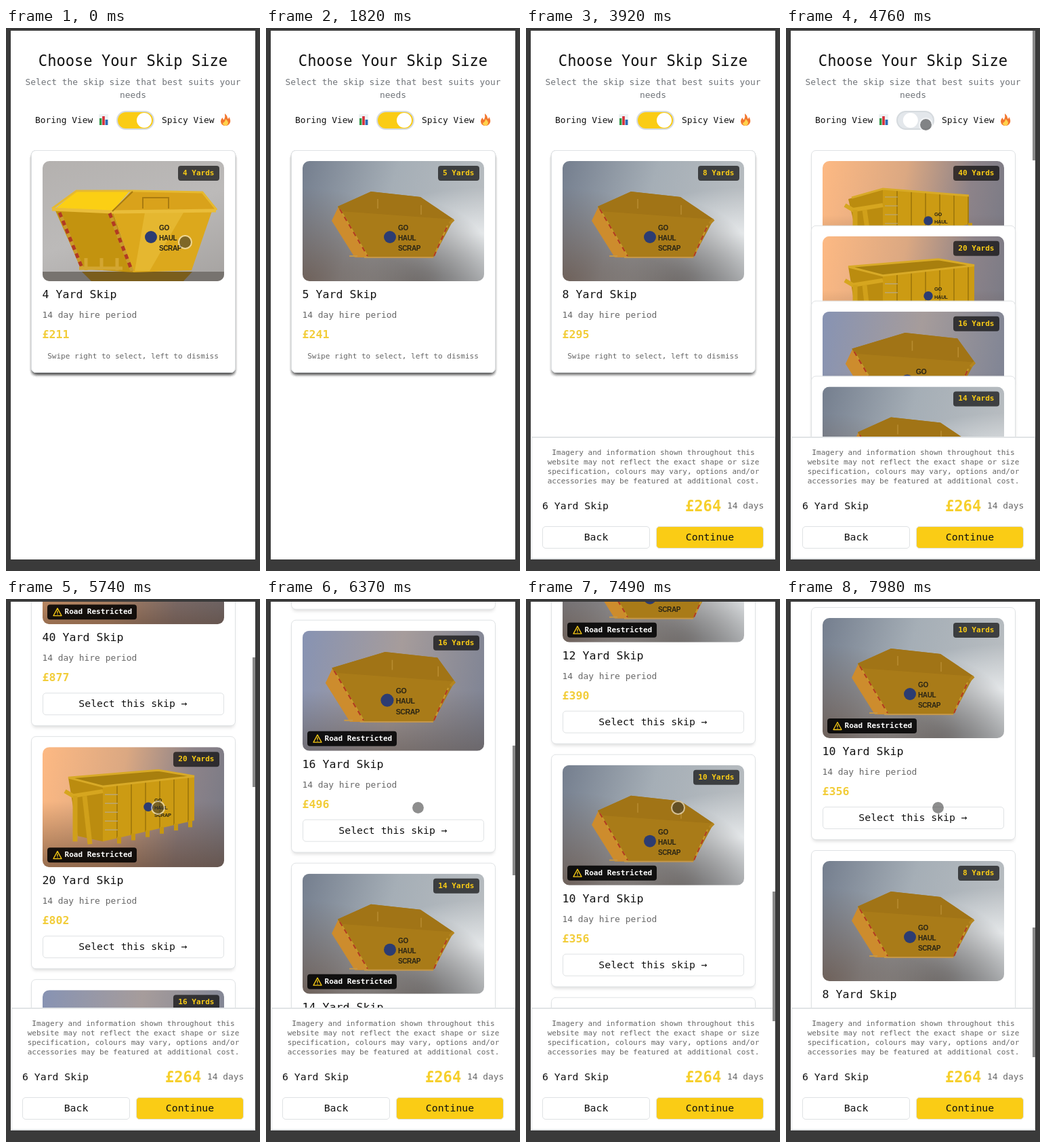
An HTML page for the animation above (8 s loop, 375 by 800 pixels).

```html
<!DOCTYPE html>
<html lang="en">
<head>
<meta charset="utf-8">
<title>Choose Your Skip Size</title>
<style>
* { box-sizing: border-box; margin: 0; }
html, body { width: 100%; height: 100%; overflow: hidden; background: #3a3a3a; }
body { font: 12.9px/20px 'DejaVu Sans Mono', 'Noto Sans Mono', monospace; color: #111; }
body * { position: absolute; white-space: nowrap; }
br { position: static; }
#win { left: 7px; top: 4px; width: 361px; height: 779px; background: #fff; overflow: hidden; }
#stage { left: -7px; top: -4px; width: 375px; height: 800px; }
#page { width: 375px; height: 800px; }
h1 { left: 0; width: 375px; top: 32px; text-align: center; font-size: 22.1px; line-height: 32px; font-weight: 400; }
.sub { left: 0; width: 375px; top: 71px; text-align: center; line-height: 18.5px; color: #6f7378; }
#track { left: 163px; top: 122px; width: 56px; height: 28px; border: 2px solid #d5dade; border-radius: 14px; }
#knob { left: 193px; top: 125px; width: 22px; height: 22px; border-radius: 50%; background: #fff; }
.icon { width: 16px; height: 18px; }
.card { left: 37px; top: 180px; width: 301.5px; height: 328px; background: #fff; border: 1.5px solid #dfe2e4;
  border-radius: 7px; box-shadow: 0 4px 5px -2px rgba(0,0,0,.14); }
.card > * { left: 15.5px; }
.pic { top: 14.5px; width: 268px; height: 177px; border-radius: 10px; overflow: hidden; }
.pic svg { left: 0; top: 0; }
.tag { height: 22px; line-height: 22px; padding: 0 7px; border-radius: 4px; background: rgba(0,0,0,.66);
  color: #facc15; font-size: 11.05px; font-weight: 700; }
.yards { top: 7px; right: 7px; }
.road { left: 7px; bottom: 7px; padding-left: 26px; color: #fff; background: rgba(0,0,0,.87); }
.road svg { left: 8px; top: 4px; }
.name { top: 202px; font-size: 16.6px; }
.days { top: 232px; color: #666; }
.price { top: 261px; font-size: 16.6px; font-weight: 700; color: #f2cd3a; }
.hint { top: 293px; width: 268px; text-align: center; font-size: 11.05px; color: #666; }
.btn { height: 33px; line-height: 30px; text-align: center; font-size: 14.8px; border: 1.5px solid #dfe2e4; border-radius: 5px; background: #fff; }
.card .btn { top: 292.5px; width: 268px; }
.card .btn, .card .road, .grid .hint { display: none; }
.grid .btn, .grid .road { display: block; }
.grid .card { height: 343px; }
#foot { left: 8px; top: 602px; width: 360px; height: 181px; background: #fff; border: 2px solid #e1e4e6; border-width: 2px 1px; }
#foot .note { left: 0; width: 358px; top: 15px; text-align: center; font-size: 11.05px; line-height: 14px; color: #666; }
#foot .btn { top: 129.5px; width: 159px; }
#bar { left: 364px; width: 4px; height: 191px; background: #8b8b8b; }
#dot { width: 21px; height: 21px; margin: -10.5px; border-radius: 50%; border: 2px solid rgba(255,255,255,.55);
  background: rgba(50,50,50,.55); background-clip: padding-box; }
</style>
</head>
<body>
<div id="win"><div id="stage">
  <div id="page">
    <h1>Choose Your Skip Size</h1>
    <div class="sub">Select the skip size that best suits your<br>needs</div>
    <span style="left:43px;top:126px">Boring View</span>
    <svg class="icon" style="left:136px;top:126px" viewBox="0 0 16 18">
      <path d="M1 1H15V17H1Z" fill="#eef1f3"/><path d="M2 7H5.4V17H2Z" fill="#2f9e44"/>
      <path d="M6.2 4H9.8V17H6.2Z" fill="#d6303a"/><path d="M10.6 9H14.4V17H10.6Z" fill="#2b6cb8"/>
    </svg>
    <div id="track"></div><div id="knob"></div>
    <span style="left:230px;top:126px">Spicy View</span>
    <svg class="icon" style="left:316px;top:126px" viewBox="0 0 16 18">
      <path d="M7 0C12 4 10 6 12 8Q13 7 13 5Q16 9 15 13Q13 18 8 18Q2 18 1 12Q1 8 4 6Q4 9 6 9Q8 5 7 0Z" fill="#f2762e"/>
      <path d="M8 8Q12 11 12 14Q11 18 8 18Q4 17 4 14Q8 12 8 8Z" fill="#ffd34d"/>
    </svg>
    <div id="cards"></div>
  </div>
  <div id="foot">
    <div class="note">Imagery and information shown throughout this<br>website may not reflect the exact shape or size<br>specification, colours may vary, options and/or<br>accessories may be featured at additional cost.</div>
    <span style="left:15px;top:90px;font-size:14.8px">6 Yard Skip</span>
    <b style="left:226px;top:90px;font-size:22.1px;color:#f6cf2c">£264</b>
    <span style="left:288px;top:90px;color:#666">14 days</span>
    <div class="btn" style="left:15px">Back</div>
    <div class="btn" style="left:183px;background:#facc15">Continue</div>
  </div>
  <div id="bar"></div>
  <div id="dot"></div>
</div></div>
<script>
const $ = id => document.getElementById(id);
const fill = (d, color) => `<path d="M${d}Z" fill="${color}"/>`;
const line = (d, color, w = 2, dash = '') => `<path d="M${d}" fill="none" stroke="${color}" stroke-width="${w}" stroke-dasharray="${dash}"/>`;
const hazard = (d, w) => line(d, '#c99a2c', w) + line(d, '#b23a22', w, '7 6');
const repeat = (n, draw) => Array.from({ length: n }, (_, i) => draw(i)).join('');
// pictures use the coordinates of a card resting in the deck
const svg = body => `<svg width="268" height="177" viewBox="54 196 268 177">${body}</svg>`;

// plain disc plus three short words printed on the side
const print = (x, y, s = 1) => `<g transform="translate(${x} ${y}) scale(${s})"><circle cx="-12" r="9" fill="#2c3c72"/>` +
  ['GO', 'HAUL', 'SCRAP'].map((w, i) => `<text y="${i * 15 - 10}" font-family="Liberation Sans, Arial, sans-serif" ` +
    `font-size="10" font-weight="700" letter-spacing="-.4" fill="#2a2515">${w}</text>`).join('') + '</g>';

const openSkip = () => svg(
  fill('54 359H322V373H54', '#77736f') +
  fill('112 359H275L262 373H126', '#7a5d1c') +
  fill('72 267L158 271L188 360L111 355', '#c3930f') +
  fill('158 271L304 270L274 357L188 360', '#dca81c') +
  fill('205 272H262L212 358H190', '#ffe16e40') +
  fill('103 241H182L157 270L72 267', '#fbcf14') +
  fill('157 270L186 239L290 242L311 268', '#d9a21b') +
  line('68 266L104 240H188L290 242L311 268', '#e6b930', 3) +
  line('68 267L157 271L310 269', '#e9bd3a', 5) +
  line('157 270L187 241M202 266V250H240V266', '#a97b10') +
  hazard('79 272L113 355', 5) + hazard('153 273L186 358', 5) +
  line('108 354H172', '#d3a631', 5) +
  repeat(3, i => line(`${118 + i * 23} 339V357`, '#d3a631', 5)) +
  print(226, 308));

const closedSkip = (peak = 155, place = '') => svg(`<g transform="${place}">` +
  fill('97 284L107 263L151 338H131', '#cd8c2d') +
  fill(`106 263L${peak} 241L${peak + 73} 249L277 282L247 338H151`, '#a97b18') +
  fill(`106 263L${peak} 241L${peak + 73} 249L277 282L110 270`, '#a17416') +
  line('271 288L277 282', '#b4851f', 4) +
  line(`${peak + 10} 252V266M${peak + 74} 261V275`, '#b98d30', 1.5) +
  hazard('109 267L150 336', 2) + hazard('248 336L268 291', 2) +
  line('123 336H135M145 338H247', '#c4974a') +
  print(195, 308) + '</g>');

function container(tall) {
  const right = tall ? 270 : 278, front = tall ? 237 : 254, drop = tall ? 10 : -15, low = tall ? 320 : 335;
  const along = (y, dy) => x => y + dy * (x - 143) / (right - 143);
  const rim = along(front, drop), base = along(low, -31);
  return svg(
    (tall ? '' : fill(`92 241L225 230L${right} 238L143 254`, '#a87f0e')) +
    fill(`92 ${tall ? 252 : 241}L143 ${front}V${low}L106 ${low - 8}`, '#bb8c0f') +
    fill(`143 ${front}L${right} ${rim(right)}V${base(right)}L143 ${low}`, '#cc9b13') +
    repeat(6, i => {
      const x = 164 + i * 21;
      return line(`${x} ${rim(x)}V${base(x)}`, '#a67d0c') + line(`${x + 3} ${base(x) - 2}v10`, '#c79710', 6);
    }) +
    line(tall ? `97 250L143 237L${right} 247` : `92 241L143 254L${right} 239L225 230Z`, '#d8aa27', 3) +
    line('87 261L99 268L143 261', '#d6a61f', 6) +
    line(`102 268V${low}M116 268L124 ${low + 4}`, '#d0a01a', 7) +
    repeat(5, i => line(`146 ${front + 12 + i * 13}h19`, '#b7a98a', 1.2)) +
    print(219, 284, .75));
}

const steel = 'radial-gradient(at 0 100%,#69564acc,transparent 55%),radial-gradient(at 65% 115%,#5f5a58e6,transparent 50%),' +
  'radial-gradient(at 100% 60%,#e4e7e9,transparent 45%),linear-gradient(105deg,#747e8e,#a5aeb6 45%,#bcc0c3)';
const peach = 'linear-gradient(transparent 45%,#5a3e2c99),linear-gradient(100deg,#fdb983,#dba882 42%,#8d8389 75%,#777985)';
const dusk = 'linear-gradient(transparent 50%,#5f555099),linear-gradient(100deg,#8793b3,#a69c9b 50%,#7c8294)';
const plain = 'linear-gradient(160deg,#b4b1af,#bcbab9 50%,#a5a2a0)';
const art = {
  40: [peach, container(true)],
  20: [peach, container(false)],
  16: [dusk, closedSkip(180, 'translate(-15 -28) scale(1.06)')],
  4: [plain, openSkip()]
};
const prices = { 40: 877, 20: 802, 16: 496, 14: 434, 12: 390, 10: 356, 8: 295, 6: 264, 5: 241, 4: 211 };
const warn = '<svg width="14" height="14" viewBox="0 0 14 14" fill="none" stroke="#facc15" stroke-width="1.3" stroke-linejoin="round"><path d="M7 1.5L13 12.5H1Z M7 5V9M7 10.2V11.2"/></svg>';

// largest first, so the smallest lies on top of the deck
const sizes = Object.keys(prices).sort((a, b) => b - a);
$('cards').innerHTML = sizes.map(n => {
  const [bg, pic] = art[n] || [steel, closedSkip()];
  return `<div class="card"><div class="pic" style="background:${bg}">${pic}<span class="tag yards">${n} Yards</span>` +
    (n > 8 ? `<span class="tag road">${warn}Road Restricted</span>` : '') +
    `</div><span class="name">${n} Yard Skip</span><span class="days">14 day hire period</span><span class="price">£${prices[n]}</span>` +
    `<span class="hint">Swipe right to select, left to dismiss</span><div class="btn">Select this skip →</div></div>`;
}).join('');
const cards = [...$('cards').children];

const LOOP = 8000, FLIP = 4715;
const part = (t, from, to) => Math.min(1, Math.max(0, (t - from) / (to - from)));
const smooth = (...a) => { const u = part(...a); return u * u * (3 - 2 * u); };
const easeOut = (...a) => 1 - (1 - part(...a)) ** 3;

// sideways drag of the three top cards
const swipes = {
  4: t => 160 * smooth(t, 660, 1120) - 80 * smooth(t, 30, 490) - 358 * smooth(t, 1430, 1800),
  5: t => -304 * smooth(t, 2400, 2830),
  6: t => 154 * smooth(t, 3170, 3410)
};

function pointer(t) {
  if (t < 2010) return [264 + swipes[4](t), 315];
  if (t < 2850) return [58 + 232 * smooth(t, 2010, 2310) + swipes[5](t), 400 - 90 * smooth(t, 2010, 2310)];
  const click = smooth(t, 3600, 4550), rest = smooth(t, 4800, 5300);
  return [314 * smooth(t, 2880, 3080) - 14 + swipes[6](t) - 248 * click + 18 * rest, 310 - 168 * click + 165 * rest];
}

function scrollAt(t) {
  const slow = part(t, 7000, 7980);
  return 335 * part(t, 5000, 5740) ** 2 + 1059 * part(t, 5740, 7000) + 823 * slow - 259 * slow * slow;
}

function draw(t) {
  const grid = t >= FLIP, [px, py] = pointer(t), scroll = scrollAt(t);
  const spread = easeOut(t, FLIP, FLIP + 396);
  $('cards').className = grid ? 'grid' : '';
  cards.forEach((card, i) => {
    const n = sizes[i], x = !grid && swipes[n] ? swipes[n](t) : 0;
    card.style.transform = `translate(${x}px,${358 * spread * i}px) rotate(${x * .09}deg)`;
    card.style.opacity = grid && n < 6 ? 0 : Math.max(0, 1 - Math.abs(x) / 150);
  });
  $('page').style.transform = `translateY(${-scroll}px)`;
  $('track').style.background = grid ? '#e3e7eb' : '#facc15';
  $('knob').style.transform = `translateX(${-27 * easeOut(t, FLIP, FLIP + 125)}px)`;
  $('foot').style.transform = `translateY(${190 * (1 - easeOut(t, 3430, 3880))}px)`;
  $('bar').style.display = grid ? '' : 'none';
  $('bar').style.top = 4 + scroll * .245 + 'px';
  $('dot').style.transform = `translate(${px}px,${py}px)`;
}

const start = performance.now();
function tick() {
  draw((performance.now() - start) % LOOP);
  requestAnimationFrame(tick);
}
tick();
</script>
</body>
</html>
```
